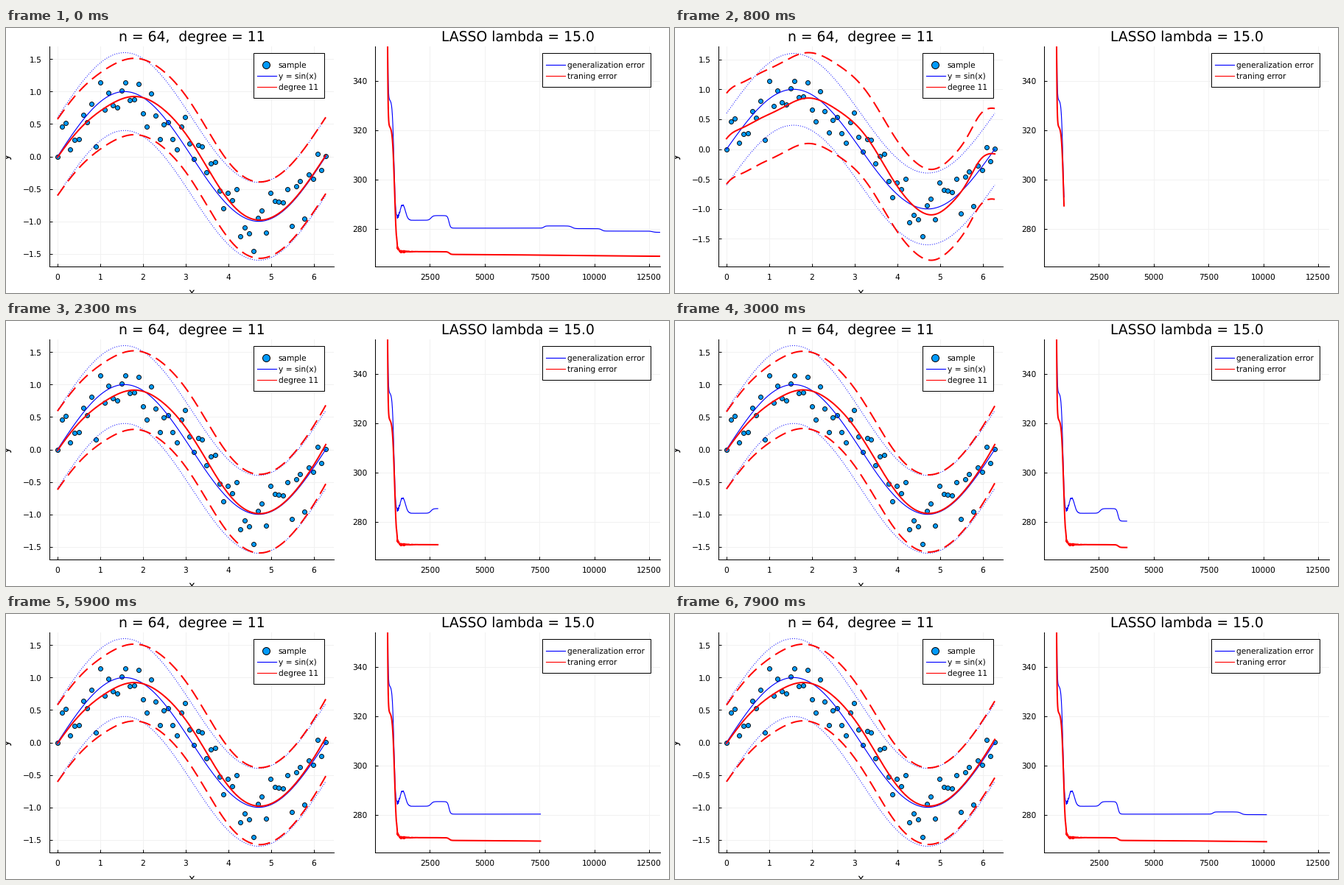
Recreate the animation shown at these times as a matplotlib script. Size 900x360 px, loop 8 s.

```python
import numpy as np
import matplotlib.pyplot as plt
from matplotlib.animation import FuncAnimation
from matplotlib.patches import Rectangle

W, H, DPI = 900, 360, 100
PX = 72 / DPI  # points per pixel
FRAMES, STEP, LAST = 80, 130, 13000
TOP, BOTTOM = 25, 324
THIN, THICK = 1.15 * PX, 2 * PX
BLUE, RED, SKY = "#0000ff", "#ff0000", "#009afa"

plt.rcParams.update({
    "font.family": "DejaVu Sans",
    "font.size": 10.66 * PX,
    "text.hinting": "none",
    "axes.linewidth": PX,
    "axes.axisbelow": True,
})


def bumps(x, *parts):
    """Sum of bell curves given as (height, centre, width)."""
    return sum(h * np.exp(-((x - c) / w) ** 2) for h, c, w in parts)


def drops(x, *parts):
    """Sum of smooth steps down given as (height, centre, width)."""
    return sum(h * (1 - np.tanh((x - c) / (2 * w))) / 2 for h, c, w in parts)


def settled(x):
    return np.sin(x) + bumps(x, (-.15, 1.15, .75), (.21, 3.15, .85)) + .0025 * x


def rough(x):
    edge = .13 * (x / (2 * np.pi)) ** 40
    return np.sin(x) - edge + bumps(x, (.19, 0, .35), (-.28, 1.2, .7), (.34, 3.3, .75),
                                    (-.11, 4.85, .5), (.17, 5.95, .3))


def train_error(it):
    return 268.6 + drops(it, (200, 542, 18), (51, 885, 45),
                         (1.1, 3380, 40), (1, 9000, 2500))


def gen_error(it):
    rise = bumps(it, (6.3, 1260, 170))
    return 278.5 + rise + drops(it, (200, 542, 18), (49, 858, 36), (-1.9, 2550, 50),
                                (5.1, 3370, 35), (-.9, 7700, 40), (1.1, 8980, 60),
                                (1, 10330, 50), (.5, 12650, 60))


rng = np.random.default_rng(11)
x = np.linspace(0, 2 * np.pi, 64)
sample = settled(x) + np.clip(rng.normal(0, .28, x.size), -.5, .5)
xs = np.linspace(0, 2 * np.pi, 300)
wave = np.sin(xs)

# Errors shiver for a while after the steep fall
its = np.arange(0, LAST + 1, 10)
shiver = np.where(its > 970, np.exp((970 - its) / 220), 0)
train = train_error(its) + shiver * rng.normal(0, 1, its.size)
gen = gen_error(its) + shiver * rng.normal(0, .6, its.size)


def fit_at(it):
    """Fitted curve and half-width of its band after `it` steps."""
    tail = np.interp(it, [7500, LAST], [.06, 0])
    dip = .03 * np.exp((1000 - it) / 2000)
    goal = settled(xs) + tail * (xs / xs[-1]) ** 20 - dip * np.sin(xs / 2)
    grow = np.interp(it, [0, 910], [.5, 1])
    mix = np.interp(it, [910, 1150], [0, 1])
    half = .6 * np.sqrt((train_error(it) - 238) / 32)
    return (1 - mix) * grow * rough(xs) + mix * goal, half


def box(left, right):
    return [left / W, 1 - BOTTOM / H, (right - left) / W, (BOTTOM - TOP) / H]


def make_axes(left, right):
    ax = fig.add_axes(box(left, right))
    ax.spines[["top", "right"]].set_visible(False)
    ax.grid(color="0.945", lw=PX)
    ax.tick_params(direction="in", length=4 * PX, width=PX)
    ax.tick_params(axis="x", pad=9.3 * PX)
    ax.tick_params(axis="y", pad=10.5 * PX)
    return ax


fig = plt.figure(figsize=(W / DPI, H / DPI), dpi=DPI, facecolor="white")
left_ax = make_axes(59, 445)
right_ax = make_axes(501, 888)

left_ax.set_xlim(-.03 * x[-1], 1.03 * x[-1])
left_ax.set_xticks(range(7))
left_ax.plot(x, sample, "o", ms=6 * PX, mfc=SKY, mec="black", mew=.9 * PX)
left_ax.plot(xs, wave, color=BLUE, lw=THIN)
for off in (-.6, .6):
    left_ax.plot(xs, wave + off, color=BLUE, lw=PX, ls=(0, (1, 2)))
fit_line, = left_ax.plot([], [], color=RED, lw=THICK)
bands = [left_ax.plot([], [], color=RED, lw=THICK, ls=(0, (8, 4)),
                      dash_capstyle="butt")[0] for _ in range(2)]

right_ax.set_xlim(0, LAST)
right_ax.set_ylim(264.6, 354.1)
right_ax.set_xticks(range(2500, 12501, 2500))
right_ax.set_yticks(range(280, 341, 20))
gen_line, = right_ax.plot([], [], color=BLUE, lw=THIN)
train_line, = right_ax.plot([], [], color=RED, lw=THICK)

# Overlay in pixel coordinates for titles and legends
top_ax = fig.add_axes([0, 0, 1, 1], zorder=5)
top_ax.set(xlim=(0, W), ylim=(H, 0))
top_ax.axis("off")


def label(px, py, text, size=10.66, **kw):
    return top_ax.text(px, py, text, fontsize=size * PX, **kw)


def legend(left, right, bottom, rows):
    top = 34
    top_ax.add_patch(Rectangle((left, top), right - left, bottom - top,
                               fc="white", ec="black", lw=PX))
    for i, (text, color, mark) in enumerate(rows):
        y = top + 15.8 + 15.1 * i
        if mark == "line":
            top_ax.plot([left + 4.5, left + 30.5], [y, y], color=color, lw=THIN)
        else:
            top_ax.plot(left + 17, y, "o", ms=10 * PX, mfc=color, mec="black", mew=PX)
        label(left + 33.5, y + 3.9, text)


legend(336, 432, 95, [("sample", SKY, "dot"), ("y = sin(x)", BLUE, "line"),
                      ("degree 11", RED, "line")])
legend(728, 875, 80, [("generalization error", BLUE, "line"),
                      ("traning error", RED, "line")])
title = label(252, 17.8, "n = 64,  degree = 11", 18.8, ha="center")
label(695, 17.8, "LASSO lambda = 15.0", 18.8, ha="center")
x_label = label(252, 364, "x", 14.6, ha="center")
label(4.5, 174.5, "y", 14.6, ha="center", va="baseline", rotation=90,
      rotation_mode="anchor")


def scale_left(lo, hi):
    pad = .03 * (hi - lo)
    lo, hi = lo - pad, hi + pad
    coarse = hi - lo > 4.2
    step, fmt = (1, "%d") if coarse else (.5, "%.1f")
    ticks = np.arange(np.ceil(lo / step), np.floor(hi / step) + 1) * step
    left_ax.set_ylim(lo, hi)
    left_ax.set_yticks(ticks, [(fmt % (t + 0.0)).replace("-", "\u2212") for t in ticks])
    # Shorter tick labels leave more room for the plot
    edge = 49 if coarse else 59
    left_ax.set_position(box(edge, 445))
    for text in (title, x_label):
        text.set_x((edge + 445) / 2)


def draw(frame):
    it = STEP * (frame - 1) if frame else LAST
    fit, half = fit_at(it)
    fit_line.set_data(xs, fit)
    for line, sign in zip(bands, (-1, 1)):
        line.set_data(xs, fit + sign * half)
    scale_left(min(-1.6, (fit - half).min()), max(1.6, (fit + half).max()))
    done = its <= it
    gen_line.set_data(its[done], gen[done])
    train_line.set_data(its[done], train[done])
    return []


anim = FuncAnimation(fig, draw, frames=FRAMES, interval=100, repeat=True,
                     repeat_delay=0, blit=False)
plt.show()
```
